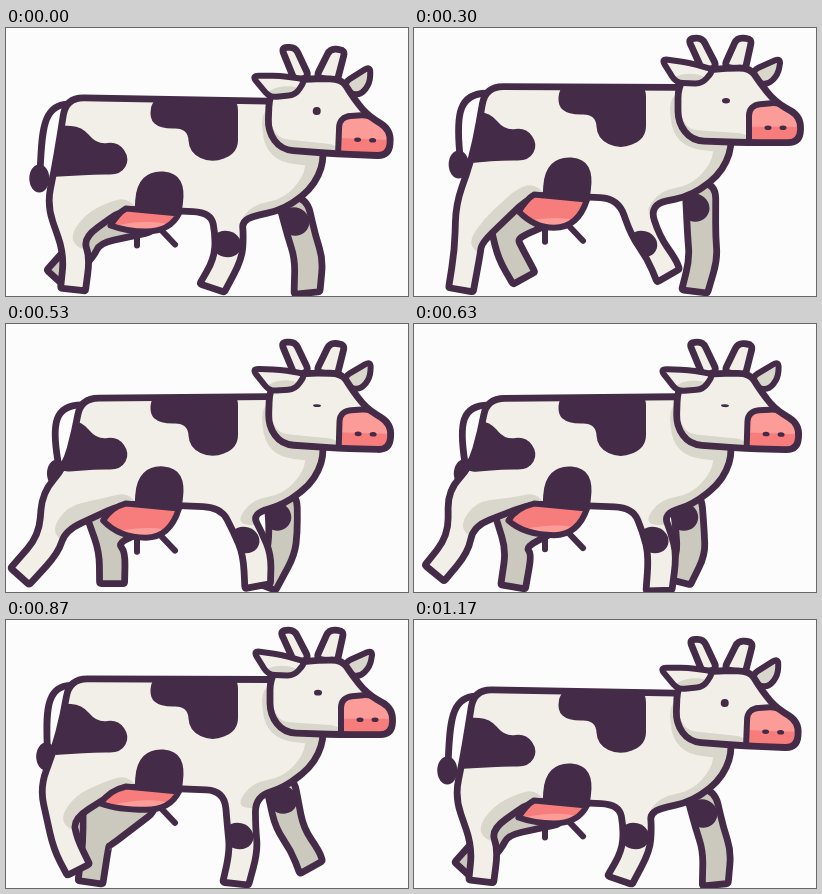
An HTML page with a canvas for the animation above (1210 ms loop, 402 by 268 pixels).

```html
<!DOCTYPE html>
<html lang="en">
<head>
<meta charset="utf-8">
<title>Walking cow</title>
<style>
html, body { margin: 0; width: 100%; height: 100%; overflow: hidden; background: #fcfcfc; }
canvas { display: block; width: 100vw; height: 100vh; }
</style>
</head>
<body>
<canvas id="stage" width="402" height="268"></canvas>
<script>
const ctx = document.getElementById('stage').getContext('2d');
const LOOP = 1210, STEP = 100 / 3, STRIDE = 1170;
const INK = '#442b47', CREAM = '#f2efe8', SHADE = '#d9d7cb', FAR = '#cbc9bd';
const PINK = '#fc9c99', ROSE = '#f77d7d';
const LINE = 6.8;

// Periodic motion: mean, cosine and sine parts, and a part at double speed.
const wave = (phase, mean, c, s = 0, twice = 0) =>
  mean + c * Math.cos(phase) + s * Math.sin(phase) + twice * Math.cos(2 * phase);

// Points on both sides of b, square to the line from a to b.
function sides(a, b, half) {
  const dx = b[0] - a[0], dy = b[1] - a[1], k = half / Math.hypot(dx, dy);
  return [[b[0] - dy * k, b[1] + dx * k], [b[0] + dy * k, b[1] - dx * k]];
}

// Legs run down the back edge, across the sole and up the front edge.
// Each far leg is the near leg half a stride later, moved along the body.
function rearLeg(p, top, shift = 0, sag = 0) {
  const hock = [wave(p, 57, 14, -3), wave(p, 224, 4)];
  const hoof = [wave(p, 51, 26, -13, -10), wave(p, 256, 5.5, 6)];
  const [heel, toe] = sides(hock, hoof, 12.5);
  const reach = [2 * hock[0] - hoof[0], 2 * hock[1] - hoof[1]];
  const [back, front] = sides(reach, hock, 13);
  return [
    [wave(p, 53, -5, 5), top + 70],
    [wave(p, 38, 3, 4), wave(p, 172, 5, 4.5)],
    back, heel, toe, front,
    [wave(p, 68, 9), wave(p, 207, 3, 8) + sag / 2],
    [118, top + 107 + sag]
  ].map(([x, y]) => [x + shift, y]);
}

function frontLeg(p, top, shift = 0) {
  const hip = wave(p, 211, -6, -7);
  const knee = [wave(p, 233, -9.5, -2), 208];
  const shin = [wave(p, 239, -14, 5, -3), 231];
  const hoof = [wave(p, 234, -21, 12.5, -7), wave(p, 259, -2.5, -8, 3.5)];
  const [heel, toe] = sides(knee, hoof, 13);
  return [
    [hip, top + 111],
    [knee[0] - 14, knee[1]], [shin[0] - 14, shin[1]],
    heel, toe,
    [shin[0] + 14, shin[1]], [knee[0] + 14, knee[1]],
    [hip + 31, top + 117]
  ].map(([x, y]) => [x + shift, y]);
}

// Closed polygon with rounded corners; points listed in sharp stay crisp.
function rounded(points, cut, sharp = []) {
  const path = new Path2D(), n = points.length;
  points.forEach((p, i) => {
    const toward = q => {
      const dx = q[0] - p[0], dy = q[1] - p[1], len = Math.hypot(dx, dy) || 1;
      const k = Math.min(sharp.includes(p) ? 2 : cut, len / 2) / len;
      return [p[0] + dx * k, p[1] + dy * k];
    };
    path.lineTo(...toward(points[(i + n - 1) % n]));
    path.quadraticCurveTo(...p, ...toward(points[(i + 1) % n]));
  });
  path.closePath();
  return path;
}

// Rounded polygon from plain x, y values, moved down by dy.
function blob(cut, dy, ...xy) {
  const points = [];
  for (let i = 0; i < xy.length; i += 2) points.push([xy[i], xy[i + 1] + dy]);
  return rounded(points, cut);
}

function oval(x, y, rx, ry, angle = 0) {
  const path = new Path2D();
  path.ellipse(x, y, rx, ry, angle, 0, 7);
  return path;
}

function fill(path, color) { ctx.fillStyle = color; ctx.fill(path); }

function stroke(path, width = LINE) {
  ctx.strokeStyle = INK;
  ctx.lineWidth = width;
  ctx.stroke(path);
}

function clipped(path, draw) {
  ctx.save();
  ctx.clip(path);
  draw();
  ctx.restore();
}

function shape(path, color, decorate = () => {}, width = LINE) {
  fill(path, color);
  clipped(path, decorate);
  stroke(path, width);
}

function turned(x, y, angle, draw) {
  ctx.save();
  ctx.translate(x, y);
  ctx.rotate(angle);
  ctx.translate(-x, -y);
  draw();
  ctx.restore();
}

function drawTail(p, top, rump) {
  const swing = Math.cos(p - 2.88);
  const tip = [42 + 9 * swing, top + 77], bulge = 41 + 5 * swing;
  const path = new Path2D();
  path.moveTo(rump[0] + 8, rump[1] + 7);
  path.bezierCurveTo(bulge, rump[1] + 3, bulge, top + 30, tip[0] + 1, tip[1] - 12);
  stroke(path);
  fill(oval(...tip, 10, 14), INK);
}

function drawTeats(low) {
  const path = new Path2D();
  path.moveTo(131, low - 4);
  path.lineTo(131, low + 14);
  path.moveTo(150, low - 7);
  path.lineTo(169, low + 13);
  stroke(path, 6);
}

function drawFarLegs(p, top) {
  const rear = rearLeg(p + Math.PI, top, 35, 22);
  shape(rounded(rear, 14, rear.slice(3, 5)), FAR);
  const front = frontLeg(p + Math.PI, top - 20, 53);
  const spot = oval((front[1][0] + front[6][0]) / 2 - 7, top + 120, 15, 14, .4);
  shape(rounded(front, 14, front.slice(3, 5)), FAR, () => fill(spot, INK));
}

function drawBody(p, top, rump) {
  const rear = rearLeg(p, top), front = frontLeg(p, top);
  const outline = [
    [280, top], rump, [rump[0] - 6, top + 35], ...rear, ...front,
    [279, top + 108], [310, top + 83], [320, top + 50], [300, top + 10]
  ];
  const body = rounded(outline, 18, [...rear.slice(3, 5), ...front.slice(3, 5)]);
  const [kx, ky] = rear[6], edge = rump[0] - 22;

  shape(body, CREAM, () => {
    // Shading under the thigh, the chest and the chin
    fill(rounded([[kx - 14, ky], [kx + 2, ky - 24], [104, top + 100],
      [122, top + 96], [150, top + 130], [kx, ky + 14]], 14), SHADE);
    fill(blob(16, top, 230, 126, 246, 103, 277, 98, 298, 75, 300, 55,
      330, 50, 314, 110, 250, 130), SHADE);
    fill(blob(14, top, 255, 10, 258, 45, 274, 61, 320, 66, 320, 30, 275, 0), SHADE);
    // Rump, back and belly patches
    fill(blob(11, top, edge, 23, 76, 25, 91, 43, 112, 40, 124, 57, 115, 73,
      88, 73, edge, 76), INK);
    fill(blob(13, top, 147, -4, 143, 17, 154, 27, 182, 27, 183, 51, 206, 62,
      232, 51, 232, -4), INK);
    fill(blob(15, top, 128, 122, 130, 84, 145, 69, 170, 71, 179, 88, 174, 122), INK);
    fill(oval(front[1][0] + 11, front[1][1] + 8, 15, 13, .3), INK);
  });
}

function drawUdder(p, top, low) {
  const left = wave(p, 100, 4.5, 5), right = 173;
  const bag = new Path2D();
  bag.moveTo(left, top + 124);
  bag.quadraticCurveTo(left + 8, top + 111, 120, top + 107);
  bag.lineTo(right, top + 112);
  bag.quadraticCurveTo(right - 9, low, 140, low);
  bag.quadraticCurveTo(left + 16, low, left, top + 124);
  bag.closePath();
  shape(bag, ROSE, () => fill(oval(130, low + 4, 42, 13, -.1), PINK), 6);
}

function drawHead(c, blink) {
  // The head nods and the ears drop only near the lowest point of the bob.
  const dip = (c + c * c) / 2, dy = -.8 + 2.5 * c + 4.5 * dip;
  ctx.save();
  ctx.translate(0, dy);
  turned(290, 45, .04 * dip, () => {
    const ear = (x, y, path, color) => turned(x, y, -.18 * dip, () =>
      shape(path, color, () => fill(oval(x - 22, 59, 20, 10), SHADE), 6));
    ear(342, 48, blob(7, 0, 338, 46, 367, 33, 364, 50, 354, 60, 343, 58), SHADE);
    shape(blob(6, 0, 274, 14, 288, 13, 303, 42, 289, 47), CREAM);
    shape(blob(6, 0, 323, 13, 338, 14, 331, 46, 310, 42), CREAM);

    const face = blob(12, 0, 264, 62, 264, 98, 278, 116, 334, 118, 386, 118,
      387, 92, 361, 77, 345, 57, 336, 43, 300, 44, 274, 50);
    shape(face, CREAM, () => {
      fill(blob(10, 0, 262, 80, 274, 105, 334, 109, 334, 122, 262, 122), SHADE);
      const muzzle = blob(5, 0, 335, 122, 335, 86, 341, 80, 362, 78, 392, 90, 392, 122);
      shape(muzzle, PINK, () => {
        ctx.fillStyle = ROSE;
        ctx.fillRect(330, 102, 70, 30);
      }, 6);
    });
    ear(298, 47, blob(7, 0, 247, 34, 275, 38, 300, 45, 288, 59, 262, 58), CREAM);
    fill(oval(354, 103, 3.5, 2.3), INK);
    fill(oval(369, 103, 3.5, 2.3), INK);
    fill(oval(312, 76, 4, 4 * blink), INK);
  });
  ctx.restore();
}

function draw(t) {
  const p = 2 * Math.PI * t / STRIDE, c = Math.cos(2 * p);
  const top = 66.5 + 7 * c;
  const rump = [wave(p, 67, -7, 4), wave(p, top - 1, -3)];
  const low = wave(p, top + 135, -5, 5);
  const blink = 1 - .65 * Math.exp(-(((t - 580) / 300) ** 4));

  ctx.fillStyle = '#fcfcfc';
  ctx.fillRect(0, 0, 402, 268);
  ctx.lineJoin = ctx.lineCap = 'round';
  drawTail(p, top, rump);
  drawTeats(low);
  drawFarLegs(p, top);
  drawBody(p, top, rump);
  drawUdder(p, top, low);
  drawHead(c, blink);
}

function tick() {
  const t = performance.now() % LOOP;
  draw(Math.min(35, Math.floor((t + 4) / STEP)) * STEP);
  requestAnimationFrame(tick);
}
tick();
</script>
</body>
</html>
```
